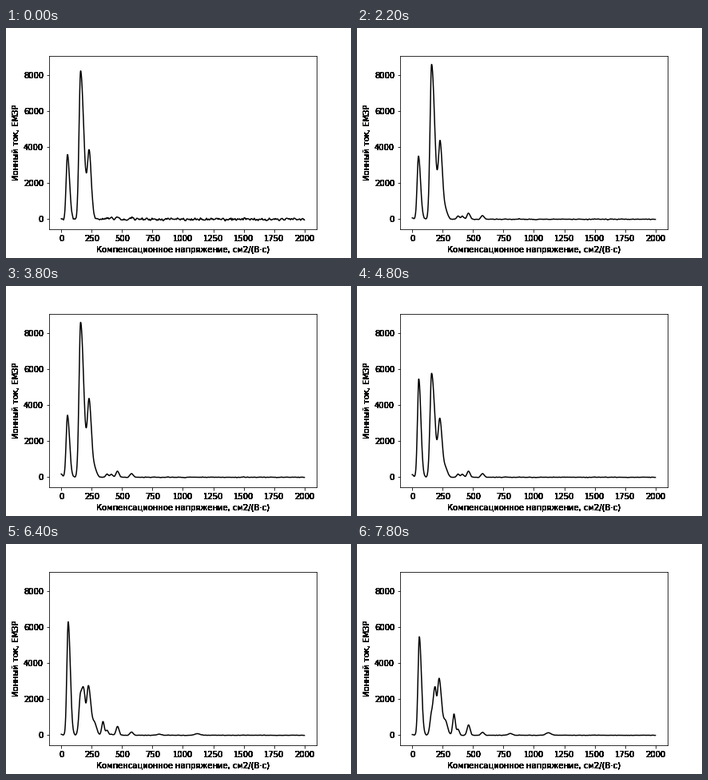
These frames come from a looping animation (432x288 px, 8 s). A matplotlib script:

```python
import numpy as np
import matplotlib.pyplot as plt
from matplotlib.animation import FuncAnimation

FRAMES, INTERVAL = 40, 200
SETTLE, SHIFT, ARRIVE = 7, 19, 24  # frames where each phase ends or starts

x = np.arange(2000)

# Minor peaks: centre, height before and after the composition changes
MINOR = [(343, 0, 1170), (376, 170, 320), (412, 180, 0), (463, 350, 580),
         (578, 200, 160), (807, 0, 100), (1120, 0, 140)]


def peak(centre, left, right, height):
    width = np.where(x < centre, left, right)
    return height * np.exp(-0.5 * ((x - centre) / width) ** 2)


def mix(a, b, t):
    return a + (b - a) * t


def averaged_noise():
    """Running mean of independent smooth noise, so it fades with time."""
    rng = np.random.default_rng(7)
    kernel = np.exp(-0.5 * (np.arange(-9, 10) / 3) ** 2)
    kernel /= np.sqrt((kernel ** 2).sum())
    raw = [30 * np.convolve(rng.standard_normal(x.size), kernel, "same")
           for _ in range(FRAMES)]
    return np.cumsum(raw, axis=0) / np.arange(1, FRAMES + 1)[:, None]


noise = averaged_noise()


def spectrum(k):
    last = FRAMES - 1
    grow = min(k / SETTLE, 1)
    t = max(0, (k - SHIFT) / (last - SHIFT))
    late = max(0, (k - ARRIVE) / (last - ARRIVE)) ** 0.7
    fade = np.sin(np.pi / 2 * t)
    swing = np.sin(0.75 * np.pi * t ** 0.8)

    y = noise[k] + peak(0, 10, 10, 40 + 140 * np.exp(-((k - 20) / 8) ** 2))
    y += peak(51 + 7 * fade, 11, 17, 3570 - 140 * min(k / SHIFT, 1) + 2870 * swing)
    y += peak(159, 13, 25.5, mix(8250 + 350 * grow, 1200, fade))
    y += peak(187, 13, 10, 1850 * late)
    y += peak(229 - 8 * t, 14.5, 18, 3700 + 430 * grow - 1500 * swing)
    y += peak(272, 20, 18, grow * mix(500, 800, late))
    for centre, before, after in MINOR:
        width = 6 + centre / 75
        y += peak(centre, width, width, (1 + grow) / 2 * mix(before, after, late))
    return y


def embolden(image, dpi):
    """Darken the soft edges of the lettering."""
    image = image.copy()
    image[..., :3] = 0
    image[..., 3] = 1 - (1 - image[..., 3]) ** 20
    return image, 0, 0


fig = plt.figure(figsize=(6, 4), dpi=72, facecolor="white")
ax = fig.add_axes([0.125, 0.125, 0.775, 0.755])
ax.set_xlim(-99.95, 2098.95)
ax.set_ylim(-554, 9079)
ax.set_xticks(range(0, 2001, 250))
ax.set_yticks(range(0, 8001, 2000))
ax.set_xlabel("Компенсационное напряжение, см2/(В·с)")
ax.set_ylabel("Ионный ток, ЕМЗР")
for text in [ax.xaxis.label, ax.yaxis.label,
             *ax.get_xticklabels(), *ax.get_yticklabels()]:
    text.set_agg_filter(embolden)

line, = ax.plot(x, spectrum(0), color="black", lw=1.5)


def update(k):
    line.set_ydata(spectrum(k))
    return line,


anim = FuncAnimation(fig, update, frames=FRAMES, interval=INTERVAL,
                     repeat=True, repeat_delay=0)
plt.show()
```
